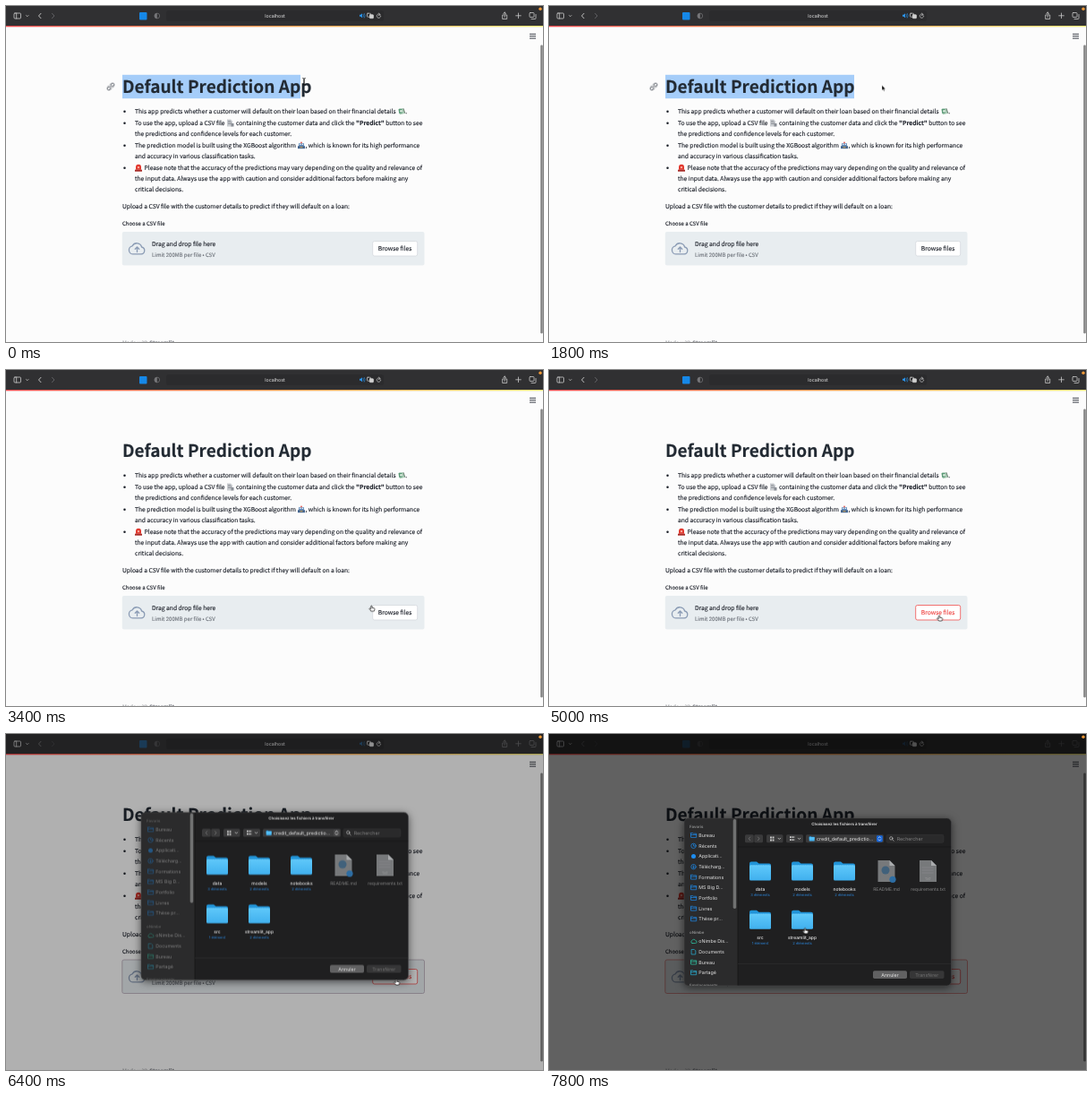
These frames come from a looping animation (600x375 px, 8 s). An HTML page:

```html
<!DOCTYPE html>
<html lang="en">
<head>
<meta charset="utf-8">
<title>Default Prediction App</title>
<style>
  html, body { margin: 0; width: 100%; height: 100%; overflow: hidden; background: #fcfcfc; }
  svg { display: block; width: 100%; height: 100%; }
  text { text-rendering: geometricPrecision; white-space: pre; }
  .page text {
    font: 6.71px "Noto Sans CJK JP", "Noto Sans CJK SC", "Noto Sans CJK", sans-serif;
    color: #1b1f28; fill: currentColor; stroke: currentColor; stroke-width: .13px;
  }
  .page .title { font-size: 19.05px; font-weight: 700; color: #222a33; }
  .page .small { font-size: 6px; }
  .page .muted { color: #6f747c; }
  .page .footer { color: #a0a2a6; }
  .page .inherit { color: inherit; }
  .bold { font-weight: 700; }
  .mid { text-anchor: middle; }
  .line { fill: none; stroke-linecap: round; stroke-linejoin: round; }
  .bar text, .dialog text { font: 5.3px Inter, sans-serif; fill: #e6e6e6; }
  .dialog .head { font-size: 4.4px; font-weight: 600; }
  .dialog .name { font-size: 5px; font-weight: 500; }
  .dialog .count { font-size: 4.15px; fill: #2b82d4; }
  .dialog .off { fill: #858585; font-weight: 400; }
  .shadow { filter: drop-shadow(0 2px 5px rgba(0, 0, 0, .6)); }

  /* One shared 8 s clock; the picture advances every 200 ms (2.5%). */
  .anim { animation: 8s step-end infinite; }
  .path { animation-name: path; }
  .beam { animation-name: beam; }
  .arrow { animation-name: arrow; }
  .hand { animation-name: hand; }
  .select { animation-name: select; }
  .link { animation-name: link; }
  .browse { animation-name: browse; }
  .zone { animation-name: zone; }
  .nav { animation-name: nav; }
  .dim { animation-name: dim; }
  .dialog { animation-name: sheet; }
  .side { animation-name: wake; }
  .knob { animation-name: knob; }

  @keyframes path {
    0% { transform: translate(333px, 84px); animation-timing-function: steps(2, end); }
    5% { transform: translate(345px, 86px); animation-timing-function: steps(4, end); }
    15%, 32.5% { transform: translate(372px, 88.5px); animation-timing-function: steps(4, end); }
    42.5%, 45% { transform: translate(408.3px, 263px); animation-timing-function: steps(3, end); }
    52.5% { transform: translate(438px, 270px); animation-timing-function: steps(4, end); }
    62.5%, 82.5% { transform: translate(436px, 273.8px); animation-timing-function: steps(3, end); }
    90% { transform: translate(395px, 252px); animation-timing-function: steps(3, end); }
    97.5%, 100% { transform: translate(286px, 216.5px); }
  }
  @keyframes beam { 0% { opacity: 1; } 7.5%, 100% { opacity: 0; } }
  @keyframes arrow { 0% { opacity: 0; } 7.5% { opacity: 1; } 40%, 100% { opacity: 0; } }
  @keyframes hand { 0% { opacity: 0; } 40%, 100% { opacity: 1; } }
  @keyframes select {
    0% { width: 199px; opacity: 1; }
    2.5% { width: 206px; }
    5% { width: 211px; opacity: 1; }
    35%, 100% { width: 211px; opacity: 0; }
  }
  @keyframes link { 0% { opacity: 1; } 37.5%, 100% { opacity: 0; } }
  @keyframes browse { 0% { color: #1b1f28; stroke: #d5d9de; } 47.5%, 100% { color: #ee4543; stroke: #f0504e; } }
  @keyframes zone { 0% { stroke: transparent; } 72.5% { stroke: #e87f7d; } 80% { stroke: #b5a9b8; } 82.5%, 100% { stroke: #e87f7d; } }
  @keyframes nav { 0% { opacity: 1; } 80% { opacity: .4; } 82.5%, 100% { opacity: .3; } }
  @keyframes dim { 0% { opacity: 0; } 80% { opacity: .3; } 82.5%, 100% { opacity: .61; } }
  @keyframes sheet {
    0% { opacity: 0; transform: none; }
    80% { opacity: 1; transform: translateY(-6.5px); }
    82.5%, 100% { opacity: 1; transform: none; }
  }
  @keyframes wake { 0% { opacity: .45; } 85%, 100% { opacity: 1; } }
  @keyframes knob { 0% { fill: #4a4a4b; } 85%, 100% { fill: #1765d8; } }
</style>
</head>
<body>
<svg viewBox="0 0 600 375">
  <defs>
    <linearGradient id="stripe"><stop stop-color="#f5484c"/><stop offset=".5" stop-color="#f99a4c"/><stop offset="1" stop-color="#f5e878"/></linearGradient>
    <linearGradient id="blue" x2="0" y2="1"><stop stop-color="#5fc8fa"/><stop offset="1" stop-color="#40b0ee"/></linearGradient>
    <clipPath id="sheetShape"><rect x="151" y="94" width="298.5" height="187" rx="5"/></clipPath>
    <g id="folder">
      <path d="M-12-8.5q0-2 2-2h6l2.500 2H10q2 0 2 2V0H-12z" fill="#2194d8"/>
      <rect x="-12" y="-6.500" width="24" height="17" rx="1.500" fill="url(#blue)"/>
      <path d="M-11.500-6.300h23" stroke="#8ad8fc" stroke-width=".5" stroke-dasharray="1 .6"/>
    </g>
    <g id="sheet">
      <path d="M-9.500-12h13l6 6v18h-19z" fill="#77797b"/>
      <path d="M3.500-12v6h6z" fill="#a9abad"/>
    </g>
    <path id="dir" d="M0-1.800v4h6.200v-4.200H3L2.300-2.600H0zM0-.7h6.200" class="line" stroke-width=".7"/>
    <path id="cloud" d="M1.600 2h3.400a1.500 1.500 0 0 0 .2-3A2.100 2.100 0 0 0 1.300-.9 1.500 1.500 0 0 0 1.600 2z" class="line" stroke-width=".7"/>
    <g id="clock" class="line" stroke-width=".7"><circle cx="3" r="2.700"/><path d="M3-1.600V.2H4.500"/></g>
    <g id="down" class="line" stroke-width=".7"><circle cx="3" r="2.700"/><path d="M3-1.300v2.600M2 .4l1 1 1-1"/></g>
    <circle id="dot" cx="3" r="2.500" stroke="none" fill="currentColor"/>
    <path id="doc" d="M1-2.700h2.800L5.300-1.200v4H1z" class="line" stroke-width=".7"/>
  </defs>

  <g class="page">
    <rect width="600" height="375" fill="#fcfcfc"/>
    <rect y="21.500" width="600" height="1.800" fill="url(#stripe)"/>
    <path d="M585 31.300h7M585 33.700h7M585 36.100h7" stroke="#3b3f48" stroke-width="1"/>
    <rect x="597.200" y="43.500" width="2.600" height="322" rx="1.300" fill="#858585"/>

    <g class="anim link line" stroke="#555b64" stroke-width=".9" transform="translate(117 90) rotate(-45)">
      <path d="M-1-1.800h-2a1.800 1.800 0 0 0 0 3.600h2M1-1.800h2a1.800 1.800 0 0 1 0 3.600h-2M-2 0h4"/>
    </g>
    <rect class="anim select" x="130" y="76.800" width="211" height="26.400" fill="#a5cdf9"/>
    <text class="title" x="130" y="97.400">Default Prediction App</text>

    <g fill="#1b1f28"><circle cx="132.500" cy="117.800" r="1.250"/><circle cx="132.500" cy="130.700" r="1.250"/><circle cx="132.500" cy="155.800" r="1.250"/><circle cx="132.500" cy="180.800" r="1.250"/></g>
    <text x="144" y="120.200">This app predicts whether a customer will default on their loan based on their financial details</text>
    <text x="446.300" y="120.200">.</text>
    <text x="144" y="133.100">To use the app, upload a CSV file</text>
    <text x="257" y="133.100">containing the customer data and click the <tspan class="bold">"Predict"</tspan> button to see</text>
    <text x="144" y="145">the predictions and confidence levels for each customer.</text>
    <text x="144" y="158.200">The prediction model is built using the XGBoost algorithm</text>
    <text x="334.500" y="158.200">, which is known for its high performance</text>
    <text x="144" y="170.100">and accuracy in various classification tasks.</text>
    <text x="154.500" y="183.200">Please note that the accuracy of the predictions may vary depending on the quality and relevance of</text>
    <text x="144" y="195">the input data. Always use the app with caution and consider additional factors before making any</text>
    <text x="144" y="206.600">critical decisions.</text>
    <text x="130" y="226">Upload a CSV file with the customer details to predict if they will default on a loan:</text>
    <text class="small" x="130" y="244.700">Choose a CSV file</text>

    <!-- banknotes, file, robot, siren -->
    <g transform="translate(442 117.700)"><path d="M-4-2.500 2-3.500 4 2-2 3.500z" fill="#a9cbb4"/><path d="M-3-3h3.500v5h-3.500z" fill="#5c9a78"/><circle cx="-.5" cy="-.4" r="1.300" fill="#dcebdf"/><path d="M2-3.400 3.800 2" stroke="#56655c" stroke-width=".8"/></g>
    <g transform="translate(250.500 130.500)"><path d="M-3.500-4h4l2 2v6h-6z" fill="#c9ccd0"/><path d="M-2.500-2h3M-2.500-.5h4M-2.500 1h4" stroke="#7c8188" stroke-width=".6"/><path d="M1 .5h3V4H1z" fill="#8b8f96"/></g>
    <g transform="translate(330 155.700)"><path d="M-3-2.500h6v3.500h-6z" fill="#6a91bd"/><path d="M-4 .5h8v3h-8z" fill="#42648f"/><circle cy="-3.200" r=".9" fill="#e0574f"/><path d="M-2-1.300h1.300M.7-1.300H2" stroke="#fff"/><path d="M-1.500 2h3" stroke="#d9a955"/></g>
    <g transform="translate(148 180.700)"><path d="M-3 2v-3a3 3 0 0 1 6 0v3z" fill="#e2392f"/><path d="M-4 2h8v2h-8z" fill="#a82b27"/><circle cy="-.5" r="1.100" fill="#ffb3a5"/></g>

    <rect class="anim zone" x="129.800" y="252" width="337.700" height="37.500" rx="2" fill="#e8edf0" stroke-width=".8"/>
    <g class="line" stroke="#8a9bb4" stroke-width="1.300" transform="translate(0 .6)"><path d="M142.500 276.300h8.500a4 4 0 0 0 .6-7.900 5.600 5.600 0 0 0-10.400-1.200 4.600 4.600 0 0 0 1.300 9.100z"/><path d="M146.500 274v-5M144.300 270.600l2.200-2.200 2.200 2.200"/></g>
    <text x="163" y="268.200">Drag and drop file here</text>
    <text class="small muted" x="163" y="280">Limit 200MB per file • CSV</text>
    <g class="anim browse">
      <rect x="409.700" y="262.500" width="50" height="16.500" rx="2" fill="#fff" stroke-width=".8"/>
      <text class="inherit mid" x="434.600" y="273">Browse files</text>
    </g>
    <text class="small footer" x="130" y="377.800">Made with <tspan class="bold" style="color: #74777e">Streamlit</tspan></text>
  </g>

  <g class="bar">
    <rect width="600" height="22" fill="#303032"/>
    <rect x="179" y="5" width="243" height="12" rx="2.500" fill="#2b2b2d"/>
    <g class="line" stroke="#c9c9ca" stroke-width=".8"><rect x="9" y="8" width="7.500" height="6" rx="1"/><path d="M11.700 8v6M22.600 10.500l1.200 1.200 1.200-1.200"/></g>
    <text class="mid" x="300.500" y="13">localhost</text>
    <g class="line" stroke="#d0d0d0" stroke-width=".7"><rect x="403.500" y="8.200" width="4" height="4" rx=".7"/><rect x="406.300" y="9.700" width="4.200" height="4" rx=".7" fill="#d0d0d0"/><path d="M418.300 9.800a2.200 2.200 0 1 0 .4 1.700M416.600 8.200l1.600 1.500-1.900.8"/></g>
    <g class="anim nav">
      <g class="line" stroke="#cfcfcf" stroke-width=".9"><path d="M39 8.300 36.500 11l2.500 2.700"/><path d="M51.500 8.300 54 11l-2.500 2.700" stroke="#67676a"/></g>
      <rect x="149" y="7" width="8.500" height="8.500" rx="1" fill="#1688e8"/>
      <circle cx="168.800" cy="11" r="2.900" fill="none" stroke="#77777a" stroke-width=".7"/><path d="M168.800 8.100a2.900 2.900 0 0 0 0 5.800z" fill="#77777a"/>
      <path d="M395 9.800h1.300l1.700-1.500v5l-1.700-1.500H395z" fill="#2b95ee"/><path d="M399.200 9.300q1.200 1.500 0 3M400.400 8.400q2 2.400 0 4.800" class="line" stroke="#2b95ee" stroke-width=".6"/>
      <g class="line" stroke="#c9c9ca" stroke-width=".8"><path d="M556.200 10h-1.500v4.500h5V10h-1.500M557.200 12.500V7M555.800 8.400 557.200 7l1.400 1.400M572.500 8v5.600M569.700 10.800h5.600"/><rect x="585" y="7.500" width="5" height="5" rx=".8"/><path d="M587 14.500h4.200q.8 0 .8-.8V9.500"/></g>
    </g>
  </g>

  <rect class="anim dim" width="600" height="375" fill="#000"/>
  <circle cx="597" cy="3.200" r="1.700" fill="#f19a38"/>

  <g class="anim dialog">
    <rect class="shadow" x="151" y="94" width="298.500" height="187" rx="5" fill="#1f1f20"/>
    <g clip-path="url(#sheetShape)">
      <rect x="151" y="94" width="60" height="187" fill="#2b2b2c"/>
      <path d="M211 94v187M211 126h239" stroke="#111" stroke-width=".6"/>
      <path d="M211 256.500h239" stroke="#333334" stroke-width=".5"/>
      <rect x="205.700" y="95" width="3.500" height="100" rx="1.750" fill="#707171"/>
      <g class="anim side" id="places"></g>
    </g>
    <rect x="151" y="94" width="298.500" height="187" rx="5" fill="none" stroke="#4c4d4f" stroke-width=".5"/>
    <text class="head mid" x="330" y="102.400">Choisissez les fichiers à transférer</text>

    <g fill="#3a3a3b">
      <rect x="219" y="112.300" width="9.700" height="9" rx="1.500"/><rect x="229.300" y="112.300" width="9.700" height="9" rx="1.500"/>
      <rect x="243" y="112.300" width="18.500" height="9" rx="1.500"/><rect x="265" y="112.300" width="19" height="9" rx="1.500"/>
      <rect x="287" y="112.300" width="87" height="9" rx="1.500"/>
      <rect x="377" y="112.300" width="64" height="9" rx="1.500" fill="#2a2a2b" stroke="#3d3d3e" stroke-width=".4"/>
    </g>
    <path d="M224.700 115l-1.500 1.800 1.500 1.800M233.500 115l1.500 1.800-1.500 1.800" class="line" stroke="#777" stroke-width=".8"/>
    <path d="M256 116.200l1.300 1.300 1.300-1.300M278.300 116.200l1.300 1.300 1.300-1.300" class="line" stroke="#ccc" stroke-width=".8"/>
    <path d="M247 115.500h4.500M247 118.500h4.500M269 115.200h5.500M269 118.200h5.500" stroke="#c8c8c8" stroke-width="1.800" stroke-dasharray="1.900 .7"/>
    <use href="#folder" transform="translate(293.700 116.800) scale(.25)"/>
    <text x="299" y="118.700">credit_default_predictio…</text>
    <rect class="anim knob" x="366" y="113.200" width="6.800" height="7.200" rx="1.300"/>
    <path d="M368.100 116l1.300-1.400 1.300 1.400M368.100 117.700l1.300 1.400 1.300-1.400" class="line" stroke="#eee" stroke-width=".7"/>
    <g class="line" stroke="#c6c6c6" stroke-width=".7"><circle cx="382.300" cy="116.400" r="1.700"/><path d="M383.600 117.700l1.600 1.600"/></g>
    <text class="off" x="388.700" y="118.700">Rechercher</text>

    <g id="files"></g>
    <use href="#sheet" x="377" y="153"/><circle cx="376" cy="152" r="4.500" fill="#41617b"/><circle cx="384" cy="162.300" r="3.600" fill="#2d6da3"/>
    <text class="name off mid" x="377" y="174.900">README.md</text>
    <use href="#sheet" x="423.500" y="153"/>
    <path d="M416.500 149h13M416.500 152h13M416.500 155h13" stroke="#8d8e90" stroke-width=".5"/>
    <text class="mid" x="423.500" y="163" style="font-size: 3.500px; fill: #a4a5a6">TXT</text>
    <text class="name off mid" x="423.500" y="174.900">requirements.txt</text>

    <rect x="362" y="264.300" width="38" height="8.800" rx="1.800" fill="#616162"/>
    <rect x="403" y="264.300" width="38.500" height="8.800" rx="1.800" fill="#363637"/>
    <text class="mid" x="381" y="270.500">Annuler</text>
    <text class="mid" x="422.200" y="270.500" style="fill: #737373">Transférer</text>
  </g>

  <g class="anim path">
    <path class="anim beam line" d="M-1.300-3.500q1.300 0 1.300 1V3q0 1-1.300 1M1.300-3.500Q0-3.500 0-2.500V3q0 1 1.300 1" stroke="#111" stroke-width=".8"/>
    <path class="anim arrow" d="M0 0v5.600l1.300-1.100.9 2 .9-.4-.9-1.900h1.900z" fill="#000" stroke="#fff" stroke-width=".4"/>
    <path class="anim hand" transform="scale(.85)" d="M-.7.500Q0-.4.700.5v2.200l2.700.6q1 .3.900 1.400-.2 1.400-.9 2.600H-.6Q-1.700 5.600-2.800 4.300q-.2-1 .9-.8l1.200.9z" fill="#fff" stroke="#111" stroke-width=".8" stroke-linejoin="round"/>
  </g>
</svg>
<script>
  const BLUE = '#1d8df0', TEAL = '#2fc9a6', CYAN = '#29b4d8';
  const heading = (label, y) => `<text class="head" x="157" y="${y}" style="fill:#8f9090">${label}</text>`;
  const rows = (items, top) => items.map(([label, icon, color], i) => {
    const y = top + i * 11.67;
    return `<use href="#${icon}" x="158.500" y="${y}" stroke="${color}" color="${color}"/>
      <text x="167.300" y="${y + 1.9}">${label}</text>`;
  }).join('');

  document.getElementById('places').innerHTML =
    heading('Favoris', 104.8) +
    rows([
      ['Bureau', 'dir', BLUE], ['Récents', 'clock', BLUE], ['Applicati…', 'dot', BLUE],
      ['Télécharg…', 'down', BLUE], ['Formations', 'dir', BLUE], ['MS Big D…', 'dir', BLUE],
      ['Portfolio', 'dir', BLUE], ['Livres', 'dir', BLUE], ['Thèse pr…', 'dir', BLUE],
    ], 113.2) +
    heading('oNimbe', 223.3) +
    rows([
      ['oNimbe Dis…', 'cloud', TEAL], ['Documents', 'doc', CYAN],
      ['Bureau', 'dir', TEAL], ['Partagé', 'dir', CYAN],
    ], 231.5) +
    heading('Emplacements', 282);

  const folders = [
    ['data', '3 éléments', 236, 153], ['models', '2 éléments', 283, 153], ['notebooks', '2 éléments', 330, 153],
    ['src', '1 élément', 236, 207.3], ['streamlit_app', '2 éléments', 283, 207.3],
  ];
  document.getElementById('files').innerHTML = folders.map(([name, count, x, y]) =>
    `<use href="#folder" x="${x}" y="${y}"/>
     <text class="name mid" x="${x}" y="${y + 21.7}">${name}</text>
     <text class="count mid" x="${x}" y="${y + 27.8}">${count}</text>`).join('');
</script>
</body>
</html>
```
